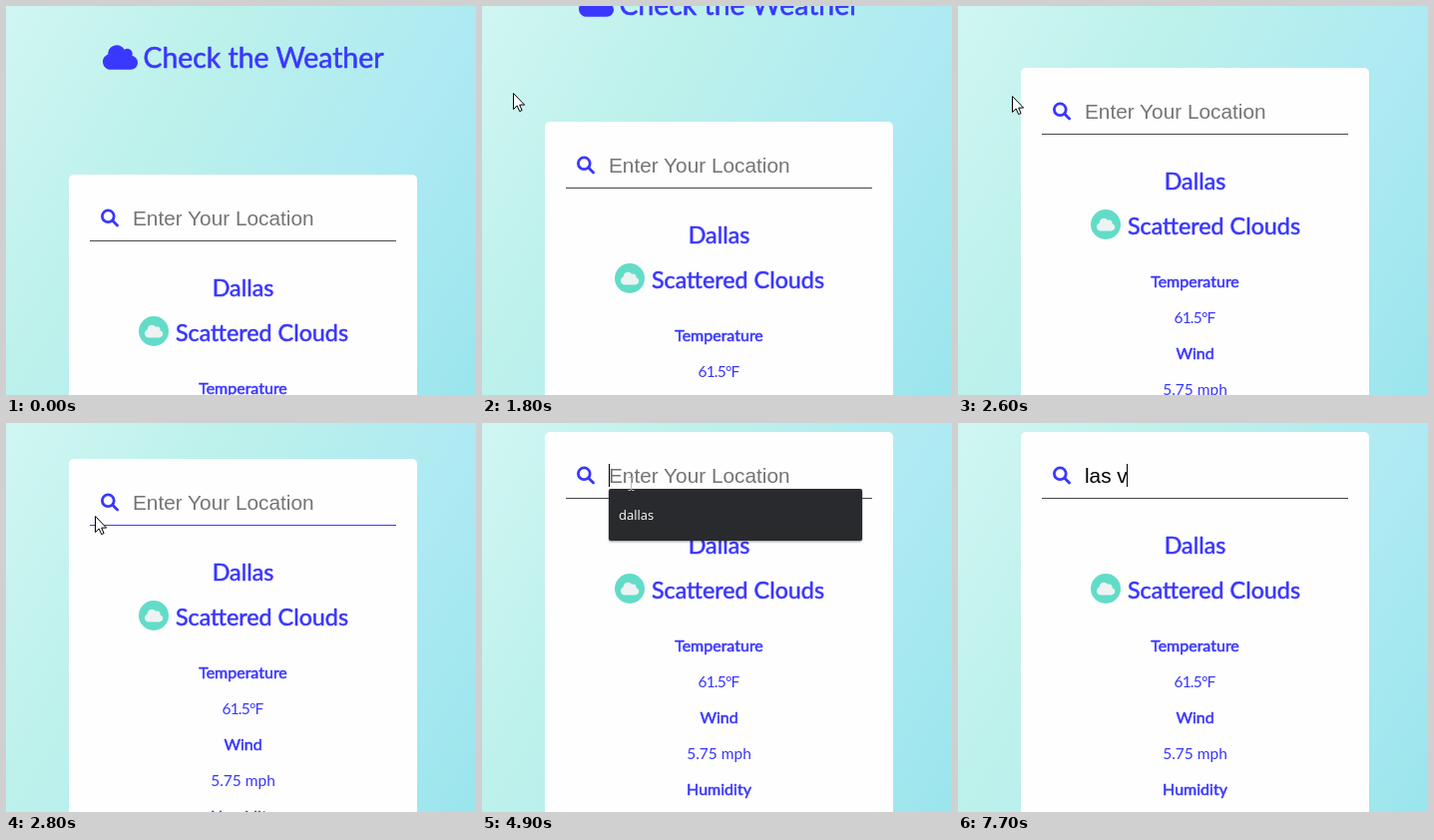
Recreate the animation shown at these times as an HTML page. Size 471 by 390 pixels, loop 8000 ms.

```html
<!DOCTYPE html>
<html lang="en">
<head>
<meta charset="utf-8">
<title>Check the Weather</title>
<style>
  html, body { margin: 0; width: 100%; height: 100%; overflow: hidden; }
  body { background: linear-gradient(120deg, #d0f6f3, #bdf1eb 32%, #aeeaf3 68%, #9be5ec); }
  svg { display: block; width: 471px; height: 390px; }
  .blue { fill: #3a37ff; font-family: Lato, sans-serif; text-anchor: middle; }
  .bold { stroke: #3a37ff; stroke-width: .55; stroke-linejoin: round; }
  .field { font: 20.8px "Liberation Sans", Arial, sans-serif; white-space: pre; }
  #menu { filter: drop-shadow(0 1px 1px #0006); }
</style>
</head>
<body>
<svg viewBox="0 0 471 390">
  <defs>
    <path id="cloud" d="M537.6 226.6c4.1-10.7 6.4-22.4 6.4-34.6 0-53-43-96-96-96-19.7 0-38.1 6-53.3 16.2C367 64.2 315.3 32 256 32c-88.4 0-160 71.6-160 160 0 2.7.1 5.4.2 8.1C40.2 219.8 0 273.2 0 336c0 79.5 64.5 144 144 144h368c70.7 0 128-57.3 128-128 0-61.9-44-113.6-102.4-125.4z"/>
  </defs>
  <g id="page">
    <use href="#cloud" fill="#3a37ff" transform="translate(97 37.6) scale(.0547)"/>
    <text class="blue bold" x="258" y="62" font-size="28.4">Check the Weather</text>

    <rect x="63" y="169" width="349" height="600" rx="5" fill="#fefefe"/>
    <g fill="none" stroke="#3a37ff" stroke-width="2.8" stroke-linecap="round">
      <circle cx="102.3" cy="210.8" r="5.9"/>
      <path d="M106.8 215.3l4.8 4.8"/>
    </g>
    <text id="placeholder" class="field" x="127" y="220" fill="#757575">Enter Your Location</text>
    <text id="typed" class="field" x="127" y="220"></text>
    <rect id="underline" x="84" y="235" width="307" height="1"/>
    <rect id="caret" y="201" width="1" height="23"/>

    <g class="blue bold" font-size="23.3">
      <text x="237.5" y="290.5">Dallas</text>
      <text x="256.5" y="335.5">Scattered Clouds</text>
    </g>
    <circle cx="148" cy="326" r="15" fill="#62dcc8"/>
    <use href="#cloud" fill="#ecf3f2" transform="translate(139 318.8) scale(.0285)"/>
    <g class="blue bold" font-size="16">
      <text x="237.5" y="389">Temperature</text>
      <text x="237.5" y="461">Wind</text>
      <text x="237.5" y="533">Humidity</text>
    </g>
    <g class="blue" font-size="15.5">
      <text x="237" y="425" letter-spacing="-.8">61.5°F</text>
      <text x="237.5" y="497">5.75 mph</text>
    </g>
  </g>

  <g id="menu">
    <rect x="127" y="66" width="254" height="52" rx="2" fill="#292a2d"/>
    <text x="137" y="97" fill="#fff" font-size="13" font-family="Open Sans, sans-serif">dallas</text>
  </g>
  <path id="arrow" d="M.5.5v16l3.7-3.5 2.5 5.6 2.4-1-2.4-5.5h4.9z" fill="#fff" stroke="#000"/>
  <path id="beam" d="M-3-6.5h2.5M.5-6.5H3M0-6V6M-3 6.5h2.5M.5 6.5H3" fill="none" stroke="#bbb"/>
</svg>
<script>
  const LOOP = 8000, STEP = 100;
  const [page, placeholder, typed, underline, caret, menu, arrow, beam] =
    ['page', 'placeholder', 'typed', 'underline', 'caret', 'menu', 'arrow', 'beam']
      .map(id => document.getElementById(id));

  // Key lists hold [tick, value...], one tick being 100 ms.
  const scrollKeys = [[15, 0], [16, 3], [17, 40], [18, 53], [21, 53], [22, 78], [23, 107],
                      [27, 107], [28, 133], [29, 160]];
  const pointerKeys = [[4, 22, 5], [5, 25, 42], [6, 29, 72], [7, 31, 87], [24, 31, 87],
                       [25, 37, 88], [28, 89, 93], [30, 122, 79], [33, 149, 61]];
  const menuKeys = [[38, 0], [39, .85], [40, 1], [66, 1], [67, .85], [68, .3], [69, .3], [70, 0]];
  const typingKeys = [[0, ''], [67, 'l'], [70, 'las'], [75, 'las '], [77, 'las v']];
  const caretKeys = [[0, 0], [39, 1], [44, 0], [49, 1], [54, 0], [58, 1], [63, 0], [67, 1]];

  const held = (keys, k) => keys.filter(key => key[0] <= k).pop()[1];

  function tween(keys, k, col = 1) {
    const i = keys.findIndex(key => key[0] > k);
    if (i < 0) return keys[keys.length - 1][col];
    if (i === 0) return keys[0][col];
    const a = keys[i - 1], b = keys[i];
    return a[col] + (b[col] - a[col]) * (k - a[0]) / (b[0] - a[0]);
  }

  const show = (el, on) => el.setAttribute('visibility', on ? 'visible' : 'hidden');
  const move = (el, x, y) => el.setAttribute('transform', `translate(${x} ${y})`);

  function draw(ms) {
    const k = Math.floor(ms % LOOP / STEP);
    move(page, 0, -Math.round(tween(scrollKeys, k)));

    const x = Math.round(tween(pointerKeys, k)), y = Math.round(tween(pointerKeys, k, 2));
    const overField = x > 127;
    move(arrow, x, y);
    move(beam, x + .5, y);
    show(arrow, k >= 4 && !overField);
    show(beam, overField && k < 70);
    underline.setAttribute('fill', k === 16 || k === 28 ? '#3a37ff' : '#484848');

    typed.textContent = held(typingKeys, k);
    show(placeholder, !typed.textContent);
    const width = typed.textContent ? typed.getComputedTextLength() : 0;
    caret.setAttribute('x', Math.floor(127 + width));
    show(caret, held(caretKeys, k));

    const alpha = tween(menuKeys, k), scale = .955 + .045 * alpha;
    menu.setAttribute('opacity', alpha);
    menu.setAttribute('transform', `translate(254 92) scale(${scale}) translate(-254 -92)`);
  }

  const start = performance.now();
  function loop() {
    draw(performance.now() - start);
    requestAnimationFrame(loop);
  }
  loop();
</script>
</body>
</html>
```
